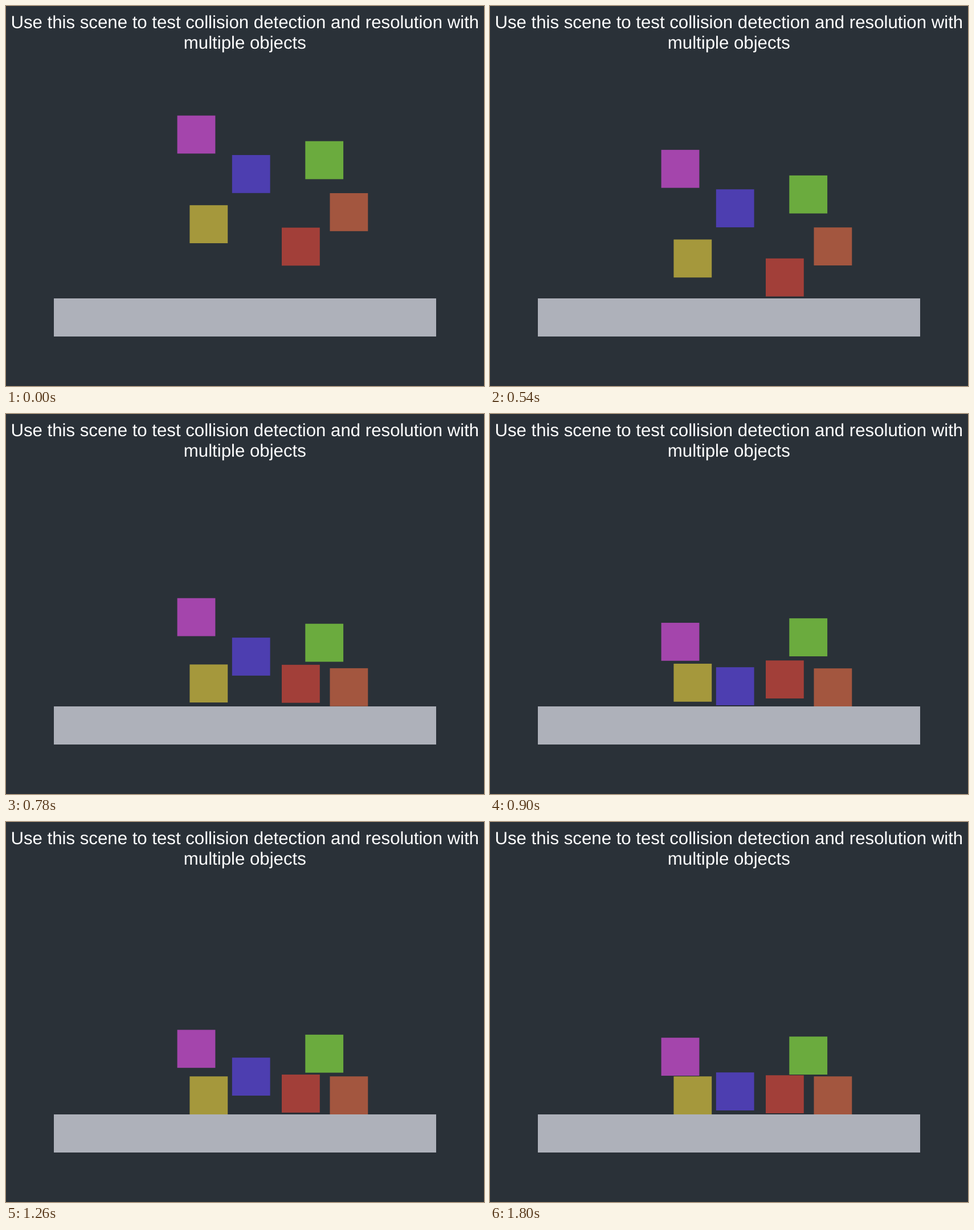
These frames come from a looping animation (839 by 668 pixels, 1.83 s). An HTML page:

```html
<!DOCTYPE html>
<html lang="en">
<head>
<meta charset="utf-8">
<title>Collision test</title>
<style>
  html, body { margin: 0; width: 100%; height: 100%; overflow: hidden; background: #2a3138; }
  svg { display: block; width: 839px; height: 668px; }
  text {
    font: 31.2px "Liberation Sans", Arial, sans-serif;
    fill: #fff; text-anchor: middle; text-rendering: geometricPrecision;
  }
</style>
</head>
<body>
<svg id="stage" viewBox="0 0 839 668">
  <text x="419.3" y="39.4">Use this scene to test collision detection and resolution with</text>
  <text x="419.3" y="75.4">multiple objects</text>
  <rect x="84" y="514" width="671" height="67" fill="#aeb1ba"/>
</svg>
<script>
const LOOP = 1830, STEP = 30, DROP = 180;
const SIZE = 66.8, PITCH = 68, FLOOR = 447.2;
const GRAVITY = 9.3e-4; // px per ms squared

// bounce: speed kept on impact; give: speed taken from a box landing on top;
// gap: clearance left above the floor.
const boxes = [
  { x: 300.6, top: 192.6, color: '#a445ac', bounce: .325 },
  { x: 396.8, top: 262, color: '#4d3eb0', bounce: .44 },
  { x: 525.3, top: 237.6, color: '#6bab3e', bounce: .38 },
  { x: 568.5, top: 329, color: '#a3563f', bounce: .05 },
  { x: 322.4, top: 350.2, color: '#a5983c', bounce: .3 },
  { x: 484, top: 389.6, color: '#a23f39', bounce: .34, give: 1, gap: 2 }
];

const stage = document.getElementById('stage');
for (const box of boxes) {
  box.el = document.createElementNS('http://www.w3.org/2000/svg', 'rect');
  const attrs = { x: box.x, width: SIZE, height: SIZE, fill: box.color };
  for (const name in attrs) box.el.setAttribute(name, attrs[name]);
  stage.append(box.el);
}

const ramp = (t, from, to) => Math.min(1, Math.max(0, (t - from) / (to - from)));

// The simulation hitches once, then slows towards the end.
const simTime = t => t - 80 * ramp(t, 660, 800) - 220 * ramp(t, 1110, 1800) ** 2;

function fall(box) {
  box.y += box.v + GRAVITY / 2;
  box.v += GRAVITY;
  const ground = FLOOR - (box.gap || 0);
  if (box.y > ground && box.v > 0) {
    box.y = ground;
    box.v *= -box.bounce;
  }
}

function collide(upper, lower) {
  const apart = Math.abs(upper.x - lower.x) >= SIZE || upper.y + PITCH <= lower.y;
  if (upper.y >= lower.y || apart || upper.v <= lower.v) return;
  const speed = upper.v;
  upper.y = lower.y - PITCH;
  upper.v = Math.min(speed, lower.v, -upper.bounce * speed);
  lower.v = (lower.give || 0) * Math.max(0, speed);
}

function simulate(ms) {
  for (const box of boxes) Object.assign(box, { y: box.top, v: 0 });
  for (let i = 0; i < ms; i++) {
    boxes.forEach(fall);
    for (const a of boxes) for (const b of boxes) collide(a, b);
  }
}

let shown = -1;
function draw() {
  const t = Math.floor(performance.now() % LOOP / STEP) * STEP;
  if (t !== shown) {
    shown = t;
    simulate(Math.round(simTime(t) - DROP));
    for (const box of boxes) box.el.setAttribute('y', box.y.toFixed(2));
  }
  requestAnimationFrame(draw);
}
draw();
</script>
</body>
</html>
```
